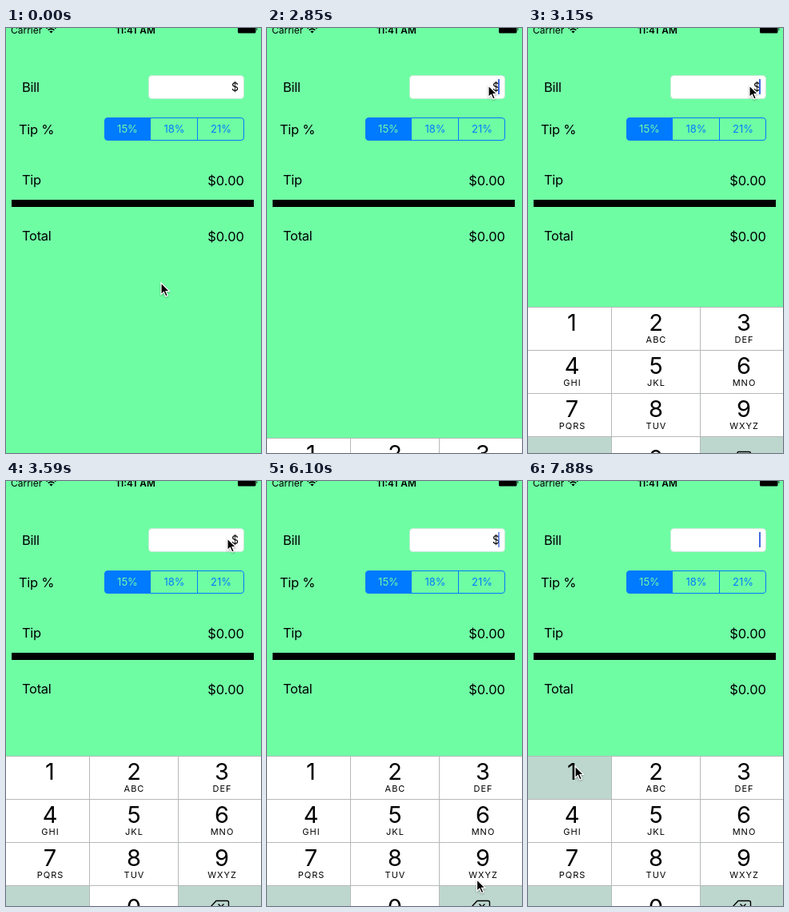
Recreate the animation shown at these times as an HTML page. Size 319 by 532 pixels, loop 8 s.

```html
<!DOCTYPE html>
<html lang="en">
<head>
<meta charset="utf-8">
<title>Tip calculator</title>
<style>
  html, body { margin: 0; width: 100%; height: 100%; overflow: hidden; background: #6ffda4; }
  svg { display: block; width: 319px; height: 532px; font-family: Inter, Roboto, "Liberation Sans", sans-serif; }
  .label { font-size: 16.5px; letter-spacing: -.3px; }
  .money { font-size: 16.5px; text-anchor: end; }
  .segment { font-size: 13px; text-anchor: middle; }
  .digit { font-size: 29px; text-anchor: middle; }
  .letters { font-size: 11px; letter-spacing: 1px; text-anchor: middle; }
</style>
</head>
<body>
<svg viewBox="0 0 319 532">
  <g id="status">
    <text x="6" y="6.5" font-size="12">Carrier</text>
    <path d="M50.5 .6Q56.5 -4.5 62.5 .6M52.7 2.7Q56.5 -.4 60.3 2.7" fill="none" stroke="#000" stroke-width="1.6"/>
    <path d="M54.3 4.3Q56.5 2.6 58.7 4.3L56.5 6.5Z"/>
    <text x="162" y="6.5" font-size="11.8" font-weight="600" text-anchor="middle" word-spacing="1">11:41 AM</text>
    <rect x="290" y="-3" width="22.5" height="9.5" rx="1.5"/>
    <path d="M313.5 -.5q1.8 2 0 4z"/>
  </g>

  <g class="label">
    <text x="20" y="80">Bill</text>
    <text x="16" y="132.5">Tip %</text>
    <text x="20" y="196">Tip</text>
    <text x="20" y="266">Total</text>
  </g>
  <g class="money">
    <text x="298" y="196.5">$0.00</text>
    <text x="298" y="266.5">$0.00</text>
  </g>
  <rect x="7" y="215" width="303" height="9"/>

  <rect x="178.5" y="59.5" width="119" height="29" rx="4" fill="#fff" stroke="#c8ead6"/>
  <text id="amount" x="291" y="79" font-size="14" text-anchor="end">$</text>
  <rect id="caret" x="289" y="64" width="2" height="19" fill="#4169dc"/>

  <g id="segments" fill="#007aff"></g>
  <g id="keyboard"></g>
  <path id="cursor" d="M0 0V14.5L3.4 11.5L5.8 17L8.4 15.9L6 10.5H10.5Z"
        stroke="#fff" stroke-width="1.2" style="filter:drop-shadow(0 1px 1px rgba(0,0,0,.3))"/>
</svg>
<script>
const LOOP = 8000;
const TICK = 148.6; // the screen refreshes at this interval, in ms
const GREEN = "#6ffda4";
const GREY = "#bdd7cf";
const WHITE = "#fff";

// Moments of interaction, counted in ticks.
const FOCUS = 19, ERASE = 44, RELEASE = 46, PRESS_ONE = 53;

// Mouse strokes: each starts where the previous one ended; `via` bends the path.
const START = [194, 319];
const strokes = [
  { from: 0, until: 4, to: [330, 474] },
  { from: 4, until: 9, to: [362, 326] },
  { from: 9, until: 11, to: [268, 112] },
  { from: 12, until: 16, to: [277, 72] },
  { from: 35, until: 42, to: [256, 506], via: [318, 450] },
  { from: 45, until: 52, to: [59, 357] }
];

const byId = id => document.getElementById(id);
const clamp = v => Math.min(1, Math.max(0, v));
const smooth = u => u * u * (3 - 2 * u);
const mix = (a, b, u) => a.map((v, i) => v + (b[i] - v) * u);

function cursorAt(tick) {
  let point = START;
  for (const { from, until, to, via } of strokes) {
    if (tick <= from) break;
    const u = smooth(clamp((tick - from) / (until - from)));
    point = via ? mix(mix(point, via, u), mix(via, to, u), u) : mix(point, to, u);
  }
  return point;
}

function caretOpacity(tick) {
  if (tick < FOCUS) return 0;
  const age = tick - (tick < ERASE ? FOCUS : ERASE);
  return age < 4 ? 1 : clamp(.7 + Math.cos((age - 2.5) * Math.PI / 3));
}

function keyboardTop(tick) {
  return tick < FOCUS ? 532 : Math.round(344 + 169 * Math.pow(1 / 6, tick - FOCUS));
}

function buildSegments() {
  const labels = ["15%", "18%", "21%"].map((label, i) =>
    `<text x="${152 + 58.5 * i}" y="131" class="segment" ${i ? "" : `fill="${GREEN}"`}>${label}</text>`);
  byId("segments").innerHTML = `
    <path d="M181 112.5H127q-3.5 0-3.5 3.5v21q0 3.5 3.5 3.5h54z"/>
    <rect x="123.5" y="112.5" width="174" height="28" rx="3.5" fill="none" stroke="#007aff"/>
    <path d="M239.5 112.5v28" stroke="#007aff"/>${labels.join("")}`;
}

function buildKeyboard() {
  const letters = ["", "ABC", "DEF", "GHI", "JKL", "MNO", "PQRS", "TUV", "WXYZ"];
  const pitch = 54;
  let markup = `<rect width="319" height="220" fill="#b5b9b7"/>`;
  for (let i = 0; i < 12; i++) {
    const column = i % 3;
    const x = column * 111 - 6;
    const y = Math.floor(i / 3) * pitch;
    const center = 55 + column * 107.5 - (column === 1 ? 2.5 : 0);
    const digit = i < 9 ? i + 1 : i === 10 ? 0 : "";
    markup += `
      <rect id="key${i}" x="${x}" y="${y + 1}" width="110" height="${pitch - 1}" fill="${digit === "" ? GREY : WHITE}"/>
      <text x="${center}" y="${y + (digit ? 30 : 38)}" class="digit">${digit}</text>
      <text x="${center + .5}" y="${y + 45}" class="letters">${letters[i] || ""}</text>`;
  }
  byId("keyboard").innerHTML = markup + `
    <path d="M263 181.5H276.5q2 0 2 2V194.5q0 2 -2 2H263L256 189ZM265.5 185.5l7 7m0-7l-7 7"
          fill="none" stroke="#000" stroke-width="1.4"/>`;
}

function render(time) {
  const tick = Math.floor(time / TICK);
  byId("cursor").setAttribute("transform", `translate(${cursorAt(tick)})`);
  byId("keyboard").setAttribute("transform", `translate(0 ${keyboardTop(tick)})`);
  byId("caret").setAttribute("opacity", caretOpacity(tick));
  byId("amount").setAttribute("opacity", tick < ERASE ? 1 : 0);
  byId("key11").setAttribute("fill", tick >= ERASE && tick < RELEASE ? WHITE : GREY);
  byId("key0").setAttribute("fill", tick >= PRESS_ONE ? GREY : WHITE);
}

buildSegments();
buildKeyboard();
const begin = performance.now();
function animate() {
  render((performance.now() - begin) % LOOP);
  requestAnimationFrame(animate);
}
animate();
</script>
</body>
</html>
```
